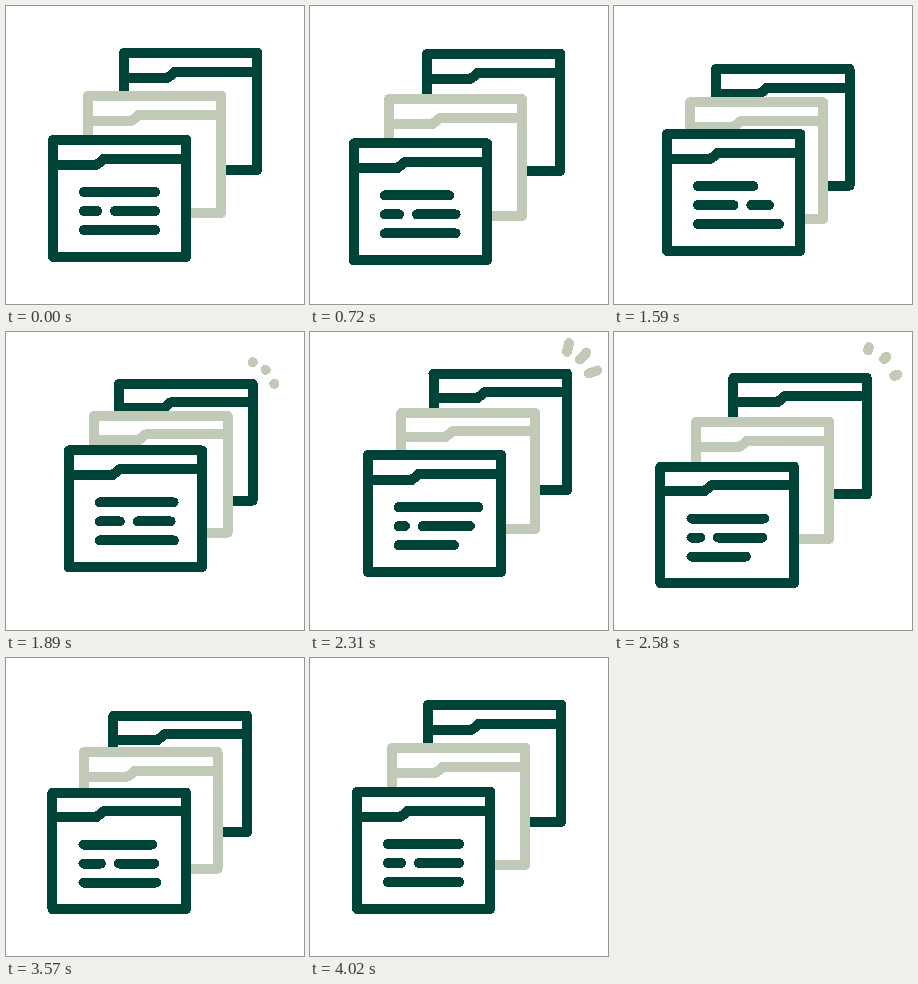
Write an HTML page that moves like this. It is 298 by 298 pixels and loops after 4.5 s.

```html
<!DOCTYPE html>
<html lang="en">
<head>
<meta charset="utf-8">
<title>Stacked windows</title>
<style>
  html, body { margin: 0; height: 100%; overflow: hidden; background: #fff; }
  svg { display: block; width: 100vw; height: 100vh; shape-rendering: crispEdges; }
  svg * { stroke-width: 10; stroke-linecap: round; stroke-linejoin: round; }
  .dark { stroke: #004338; }
  .sage { stroke: #c1c9b7; }
</style>
</head>
<body>
<svg viewBox="0 0 298 298" fill="none">
  <defs>
    <g id="window">
      <path fill="#fff" d="M5 5h133.4v116.8H5z"/>
      <path d="M5 29.7h44l7-6h82.4"/>
    </g>
  </defs>
  <g id="back">
    <use class="dark" href="#window" x="113" y="42"/>
    <path id="sparks" class="sage"/>
  </g>
  <g id="middle"><use class="sage" href="#window" x="77" y="85"/></g>
  <g id="front" class="dark">
    <use href="#window" x="42" y="129"/>
    <path id="text"/>
  </g>
</svg>
<script>
const DURATION = 4500, FIRST_BEAT = 300, BEAT = 880, MOVE = 780, DELAY = 150;
const el = id => document.getElementById(id);

// Sine ease from 0 to 1.
function ease(t, start, length) {
  const p = Math.min(1, Math.max(0, (t - start) / length));
  return (1 - Math.cos(Math.PI * p)) / 2;
}

// Offset from rest: one eased move per beat through low, high and low, then home.
// Each later part in a group follows DELAY behind the one before.
function swing(t, order, low, high, lowAgain = low) {
  let from = 0;
  return [low, high, lowAgain, 0].reduce((offset, to, beat) => {
    const step = to - from;
    from = to;
    return offset + step * ease(t, FIRST_BEAT + beat * BEAT + order * DELAY, MOVE);
  }, 0);
}

function place(id, d) {
  el(id).setAttribute('transform', `translate(${d} ${-d})`);
}

// A stroke along a ray, from share `tail` to share `head` of its length.
function spark(x, y, dx, dy, tail, head) {
  return `M${x + dx * tail} ${y + dy * tail}L${x + dx * head} ${y + dy * head}`;
}

function draw(now) {
  const t = now % DURATION;

  place('front', swing(t, 0, -6, 16));
  place('middle', swing(t, 1, -12, 10.3));
  place('back', swing(t, 2, -17, 5.5));

  const end1 = 149 + swing(t, 1, -24, 9, -7);
  const split = 91 + swing(t, 2, 24, -7, 7);
  const end3 = 149 + swing(t, 3, 10, -17, 2);
  el('text').setAttribute('d',
    `M78 186H${end1}M78 205H${split}M${split + 18} 205H149M78 224H${end3}`);

  const head = ease(t, 1870, 400), tail = ease(t, 2400, 300);
  const visible = t > 1830 && tail < 1;
  el('sparks').setAttribute('d', visible
    ? spark(251.5, 25.5, 2, -9, tail, head)
      + spark(264.5, 33, 6.5, -7, tail, head)
      + spark(273, 47, 9, -3, tail, head)
    : '');

  requestAnimationFrame(draw);
}
requestAnimationFrame(draw);
</script>
</body>
</html>
```
